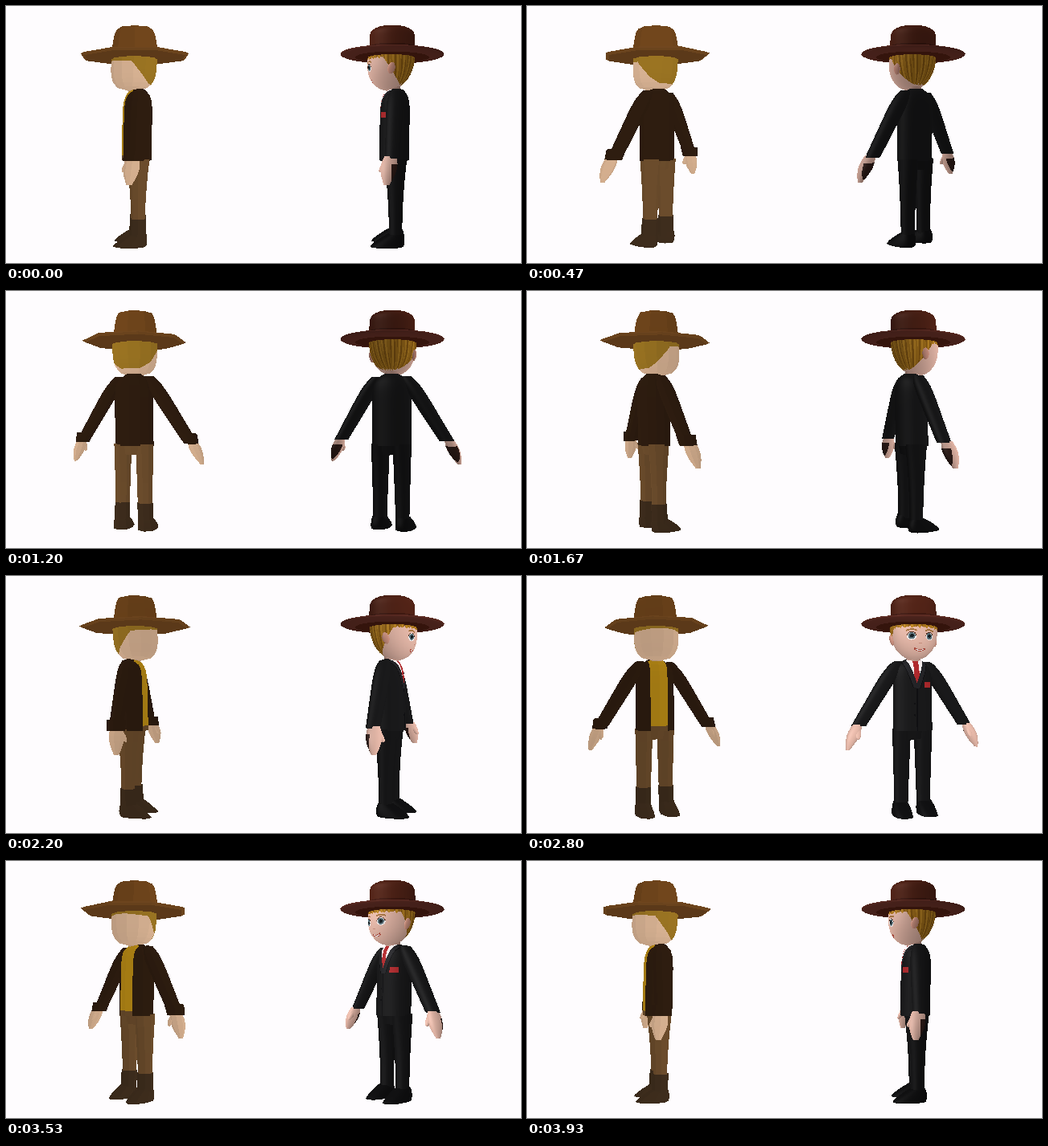
Recreate the animation shown at these times as an HTML page with a canvas. Size 640 px wide and 320 px high, loop 3.99 s.

```html
<!DOCTYPE html>
<html lang="en">
<head>
<meta charset="utf-8">
<title>Turntable</title>
<style>
html, body { margin: 0; width: 100%; height: 100%; overflow: hidden; background: #fefcfe; }
canvas { display: block; width: 640px; height: 320px; }
</style>
</head>
<body>
<canvas id="stage" width="640" height="320"></canvas>
<script>
const W = 640, H = 320, MID = 160, DIST = 600;
const LOOP = 3990, STEPS = 60;
const ctx = document.getElementById('stage').getContext('2d');
const img = ctx.createImageData(W, H);
const near = new Float32Array(W * H);

const rgb = h => [h >> 16, h >> 8 & 255, h & 255];
const plain = h => { const c = rgb(h); return () => c; };
const mix = (a, b) => t => a + (b - a) * t;
const swell = (end, mid, e) => t => end + (mid - end) * Math.max(0, Math.sin(Math.PI * t)) ** e;
const rise = (start, full, e) => t => full - (full - start) * (1 - t) ** e;
const egg = (r, e, f) => t => r * (1 - t ** e) ** f;
const unit = v => {
  const l = Math.hypot(...v) || 1;
  return v.map(q => q / l);
};

// A skin round the line a-b; rx and rz give its radii along the line.
function tube(fig, paint, a, b, rx, rz = rx, { n = 6, seg = 8, turn = 0, power = 1 } = {}) {
  if (fig.smooth) { n *= 3; seg = 32; }
  const bulge = v => Math.sign(v) * Math.abs(v) ** power;
  const verts = [], quads = [];
  for (let i = 0; i <= n; i++) {
    const t = i / n, [x, y, z] = a.map((q, m) => mix(q, b[m])(t));
    for (let j = 0; j < seg; j++) {
      const w = (j + turn) / seg * 2 * Math.PI;
      verts.push({ p: [x + rx(t) * bulge(Math.cos(w)), y, z + rz(t) * bulge(Math.sin(w))], n: [0, 0, 0] });
    }
  }
  for (let i = 0; i < n; i++) {
    for (let j = 0; j < seg; j++) {
      const k = (j + 1) % seg, row = i * seg;
      const v = [row + j, row + k, row + seg + k, row + seg + j].map(m => verts[m]);
      const d = v[2].p.map((q, m) => q - v[0].p[m]);
      const e = v[3].p.map((q, m) => q - v[1].p[m]);
      const normal = unit([e[1] * d[2] - e[2] * d[1], e[2] * d[0] - e[0] * d[2], e[0] * d[1] - e[1] * d[0]]);
      v.forEach(o => normal.forEach((q, m) => o.n[m] += q));
      quads.push({ v, normal });
    }
  }
  verts.forEach(o => o.n = unit(o.n));
  fig.parts.push({ verts, quads, paint });
}

function pair(fig, paint, [ax, ay, az], [bx, by, bz], ...rest) {
  for (const side of [1, -1]) tube(fig, paint, [ax * side, ay, az], [bx * side, by, bz], ...rest);
}

// The build both figures share
function body(fig, { neck, coat, sleeve, hand, pants, shoe }) {
  tube(fig, neck, [0, 95, 0], [0, 112, -2], mix(9, 9));
  tube(fig, coat, [0, 104, -4], [0, 192, -2], rise(9, 25, 13), rise(9, 18.5, 11), { n: 12, seg: 12 });
  pair(fig, sleeve, [19, 107, -4], [69, 186, 0], t => rise(6, 12, 9)(t) - 3 * t, t => rise(6, 11, 9)(t) - 3 * t, { n: 8 });
  pair(fig, hand, [71, 184, 2], [83, 214, 6], t => 2 + 5.5 * Math.sin(Math.PI * (.2 + .8 * t)),
    t => 3 + 6 * Math.sin(Math.PI * (.2 + .8 * t)));
  pair(fig, hand, [71, 188, 6], [72, 201, 13], swell(1, 3.5, .5));
  tube(fig, pants, [0, 182, -4], [0, 203, -4], mix(24, 22), mix(15, 11));
  pair(fig, pants, [14, 190, -4], [14.5, 284, -4], mix(11.5, 8.5), t => 8 + 6 * (1 - t) ** 2);
  pair(fig, shoe, [15.5, 280, -4], [16, 295.5, 6.5], rise(8.5, 11.5, 2), rise(8.5, 20, 1.6), { power: .85 });
}

// Faceted figure
const poly = {
  cx: 160, parts: [],
  shade: n => [1 - .05 * n[0] - .03 * n[1] - .06 * n[2], 0]
};
{
  const skin = rgb(0xcaa78a), hair = rgb(0x906c20), coat = rgb(0x2b1b0f);
  const shirt = rgb(0xac8114), pants = rgb(0x644729);
  const brim = rgb(0x6a431d), under = rgb(0x5e3b1a);
  const sleeve = plain(0x2b1b0f), boot = plain(0x3a2a1b);

  tube(poly, plain(0x69411a), [0, 29, 0], [0, 60, 0], t => 22 + 7 * t ** .5);
  tube(poly, (x, y) => y > 65 ? under : brim, [0, 59, 0], [0, 67, 0],
    swell(24, 64, .3), swell(24, 70, .3), { n: 4, turn: .5 });
  tube(poly, (x, y, z) => y < 69 + x * x / 250 || (y < 98 && z < (77 - y) * .8) ? hair : skin,
    [0, 58, 0], [0, 107, 3], egg(28.5, 5, .5), undefined, { n: 10, seg: 12 });
  body(poly, {
    neck: plain(0xbd9a7d),
    coat: (x, y, z) => z < 2 || Math.abs(x) > 11 ? coat : y < 186 ? shirt : pants,
    sleeve, hand: plain(0xc6a385), pants: plain(0x644729), shoe: boot
  });
  pair(poly, sleeve, [67, 177, 0], [71, 189, 1], mix(11, 9), mix(11.5, 11));
  pair(poly, boot, [14.5, 262, -4], [15.5, 290, -3], mix(10, 10));
}

// Smooth figure
const sleek = {
  cx: 480, smooth: true, parts: [],
  shade(n, s, c) {
    const vx = n[0] * s - n[2] * c, vd = n[0] * c + n[2] * s;
    const h = Math.max(0, -.5 * vx - .3 * n[1] - .81 * vd);
    return [.9 + .06 * n[0] - .1 * n[1] + .2 * n[2], 18 * h ** 12];
  }
};
{
  const skin = rgb(0xcfa698), white = rgb(0xdcd6d6), red = rgb(0x9c2528), dark = rgb(0x0e0e10);
  const suit = rgb(0x171718), lapel = rgb(0x202023), shadow = rgb(0x2e1c18);
  const iris = rgb(0x52676f), pupil = rgb(0x121a1e), lash = rgb(0x4a2a1c), brow = rgb(0x96683a);
  const lips = rgb(0xa5483c), nose = rgb(0xb98576);
  const golds = [0xac7a22, 0x966719, 0x7d5212].map(rgb);
  const crown = rgb(0x4a2015), band = rgb(0x3a1710), brim = rgb(0x552820), under = rgb(0x41190f);

  const eye = (x, y) => {
    const dx = Math.abs(x) - 11, dy = y - 78.5, r = Math.hypot(dx, dy);
    const rim = Math.hypot(dx / 5.4, dy / 5);
    if (rim > 1) return null;
    if (rim > .85 && dy < 0) return lash;
    return r < 2.1 ? pupil : r < 3.9 ? iris : white;
  };
  const face = (x, y) => {
    const ax = Math.abs(x), smile = Math.abs(y - 95 + x * x * .04);
    if (Math.abs(ax - 11) < 6 && Math.abs(y - 71 - (ax - 11) ** 2 * .04) < .9) return brow;
    if (ax < 2 && Math.abs(y - 87) < .7) return nose;
    if (ax < 7 && smile < 1.2) return smile < .5 && ax < 5 ? white : lips;
    return skin;
  };
  const head = (x, y, z) => {
    const turn = Math.atan2(x, z), wave = Math.sin(turn * 23) + Math.sin(turn * 41 + y * .08);
    if (y < 68 + wave * .7 || (y < 99 + wave && z < 12 - (y - 66) * .65)) {
      return golds[wave > .6 ? 0 : wave > -.7 ? 1 : 2];
    }
    return z < 0 ? skin : eye(x, y) || face(x, y);
  };
  const jacket = (x, y, z) => {
    if (z < 1) return suit;
    const ax = Math.abs(x), open = (134 - y) * .36;
    if (ax < open) return y > 106 && ax < 3.4 ? red : white;
    if (Math.abs(x + 15) < 5 && Math.abs(y - 136) < 3.4) return red;
    if (y < 140 && ax < open + 7) return ax > open + 6 ? dark : lapel;
    if (ax < .7 && y > 134) return dark;
    return Math.hypot(x - 3, (y - 152) % 14 - 7) < 1.2 && y > 152 && y < 180 ? dark : suit;
  };

  tube(sleek, (x, y) => y > 51 ? band : crown, [0, 28, 0], [0, 60, 0], rise(19, 28.5, 9));
  tube(sleek, (x, y, z) => Math.hypot(x, z) > 46 ? brim : under, [0, 57, 0], [0, 65, 0], swell(24, 64.3, .35));
  tube(sleek, head, [0, 56, 0], [0, 106, 6], egg(29.5, 3.2, .6));
  pair(sleek, plain(0xb98474), [29, 74, 0], [27, 88, 2], swell(0, 2.5, .5), swell(0, 4.5, .5));
  body(sleek, {
    neck: plain(0xb08a7e), coat: jacket, sleeve: plain(0x171718),
    hand: (x, y, z) => z < 1 && y > 192 ? shadow : skin,
    pants: plain(0x141415), shoe: plain(0x0f0f10)
  });
}

function fill({ shade }, paint, [A, B, C], flat, s, c) {
  const [ax, ay, ak] = A.q, [bx, by, bk] = B.q, [cx, cy, ck] = C.q;
  const area = (bx - ax) * (cy - ay) - (by - ay) * (cx - ax);
  if (Math.abs(area) < 1e-6) return;
  const x0 = Math.max(0, Math.floor(Math.min(ax, bx, cx))), x1 = Math.min(W - 1, Math.ceil(Math.max(ax, bx, cx)));
  const y0 = Math.max(0, Math.floor(Math.min(ay, by, cy))), y1 = Math.min(H - 1, Math.ceil(Math.max(ay, by, cy)));
  for (let y = y0; y <= y1; y++) {
    for (let x = x0; x <= x1; x++) {
      const px = x + .5, py = y + .5;
      const u = ((bx - px) * (cy - py) - (by - py) * (cx - px)) / area;
      const v = ((cx - px) * (ay - py) - (cy - py) * (ax - px)) / area;
      const w = 1 - u - v;
      if (u < 0 || v < 0 || w < 0) continue;
      const k = u * ak + v * bk + w * ck, i = y * W + x;
      if (k <= near[i]) continue;
      near[i] = k;
      const blend = key => A[key].map((q, m) => u * q + v * B[key][m] + w * C[key][m]);
      const col = paint(...blend('p'));
      const [light, gloss] = shade(flat || blend('n'), s, c);
      for (let m = 0; m < 3; m++) img.data[i * 4 + m] = col[m] * light + gloss;
    }
  }
}

function draw(fig, angle) {
  const s = Math.sin(angle), c = Math.cos(angle);
  for (const { verts, quads, paint } of fig.parts) {
    for (const o of verts) {
      const [x, y, z] = o.p, k = DIST / (DIST + x * c + z * s);
      o.q = [fig.cx + (x * s - z * c) * k, MID + (y - MID) * k, k];
    }
    for (const { v: [a, b, d, e], normal } of quads) {
      const flat = fig.smooth ? null : normal;
      fill(fig, paint, [a, b, d], flat, s, c);
      fill(fig, paint, [a, d, e], flat, s, c);
    }
  }
}

function render(step) {
  const d = img.data, angle = step / STEPS * 2 * Math.PI;
  near.fill(0);
  for (let i = 0; i < d.length; i += 4) {
    d[i] = d[i + 2] = 254;
    d[i + 1] = 252;
    d[i + 3] = 255;
  }
  draw(poly, angle);
  draw(sleek, angle);
  ctx.putImageData(img, 0, 0);
}

// Each pose holds for 60 or 70 ms: step times are rounded to 10 ms.
const start = performance.now();
let shown = -1;
function tick() {
  const t = Math.floor((performance.now() - start) % LOOP / 10) * 10;
  const step = Math.min(STEPS - 1, Math.floor((t + 4) * 3 / 200));
  if (step !== shown) render(shown = step);
  requestAnimationFrame(tick);
}
tick();
</script>
</body>
</html>
```
